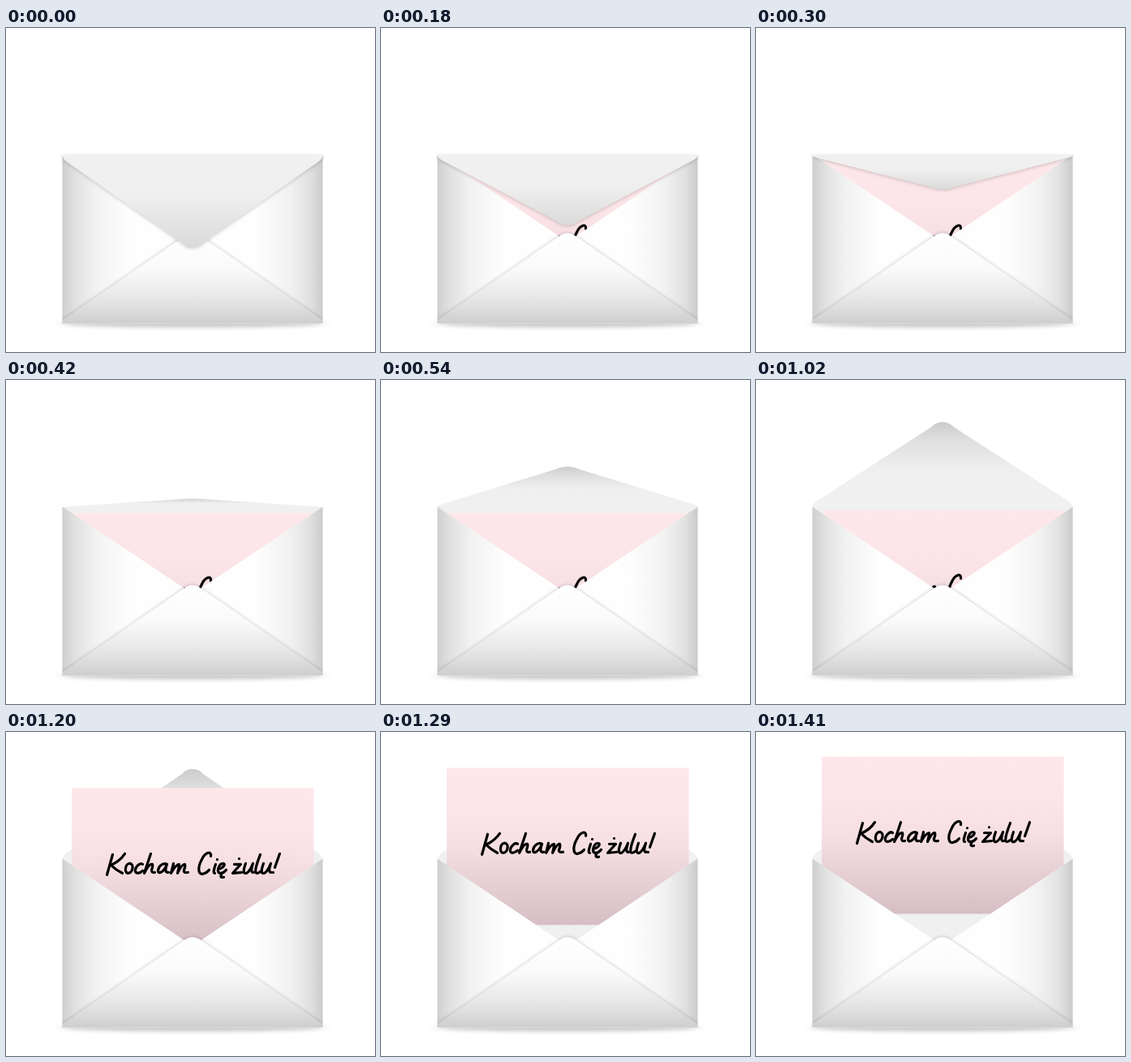
Write an HTML page that moves like this. It is 455 px wide and 400 px high and loops after 1530 ms.

```html
<!DOCTYPE html>
<html lang="pl">
<head>
<meta charset="utf-8">
<title>Koperta</title>
<style>
  html, body { margin: 0; width: 100%; height: 100%; overflow: hidden; background: #fff; }
  svg { display: block; width: 455px; height: 400px; }
  #front { filter: drop-shadow(0 1px 2px rgba(0, 0, 0, .2)); }
  #bottom { filter: drop-shadow(0 0 2px rgba(0, 0, 0, .24)); }
  #ink { fill: none; stroke: #000; stroke-width: 3.2; stroke-linecap: round; stroke-linejoin: round; }
</style>
</head>
<body>
<svg viewBox="0 0 455 400">
  <defs>
    <linearGradient id="outside" x2="0" y2="1">
      <stop stop-color="#f1f1f1"/><stop offset=".45" stop-color="#efefef"/>
      <stop offset="1" stop-color="#dadada"/>
    </linearGradient>
    <linearGradient id="inside" x2="0" y2="1">
      <stop stop-color="#f1f1f1"/><stop offset=".45" stop-color="#efefef"/>
      <stop offset=".8" stop-color="#dedede"/><stop offset="1" stop-color="#cbcbcb"/>
    </linearGradient>
    <linearGradient id="paperFill" x2="0" y2="1">
      <stop stop-color="#fee7ea"/><stop offset=".3" stop-color="#fce5e8"/>
      <stop offset=".5" stop-color="#f6dfe3"/><stop offset="1" stop-color="#d5bfc4"/>
    </linearGradient>
    <linearGradient id="sideFill">
      <stop stop-color="#cfcfcf"/><stop offset=".05" stop-color="#e1e1e1"/>
      <stop offset=".13" stop-color="#f2f2f2"/><stop offset=".26" stop-color="#fefefe"/>
      <stop offset=".74" stop-color="#fefefe"/><stop offset=".87" stop-color="#f2f2f2"/>
      <stop offset=".95" stop-color="#e1e1e1"/><stop offset="1" stop-color="#cbcbcb"/>
    </linearGradient>
    <linearGradient id="bottomFill" x2="0" y2="1">
      <stop stop-color="#fff"/><stop offset=".4" stop-color="#fafafa"/>
      <stop offset=".75" stop-color="#e5e5e5"/><stop offset="1" stop-color="#cecece"/>
    </linearGradient>
    <filter id="soft" x="-20%" y="-200%" width="140%" height="500%">
      <feGaussianBlur stdDeviation="8 2.5"/>
    </filter>
    <clipPath id="body"><path d="M69.500 150H390.500V364.500H69.500Z"/></clipPath>
    <path id="flap" d="M-.5 0Q0 5 6 9L147 108Q152 114 160 114Q168 114 173 108L314 9Q320 5 320.500 0Z"/>
  </defs>

  <ellipse cx="230" cy="365" rx="162" ry="5" fill="#000" opacity=".2" filter="url(#soft)"/>
  <use id="back" href="#flap" fill="url(#inside)"/>
  <path d="M69.500 157H390.500V364H69.500Z" fill="#f0f0f0"/>
  <g id="paper">
    <path d="M81 0H379.500V194H81Z" fill="url(#paperFill)"/>
    <g id="ink" role="img"></g>
  </g>
  <path d="M69.500 156.500L230 264L390.500 156.500V364.500H69.500Z" fill="url(#sideFill)"/>
  <g clip-path="url(#body)">
    <path id="bottom" d="M69 364.500V361L219 257.500Q230 249 241 257.500L391 361V364.500Z" fill="url(#bottomFill)"/>
  </g>
  <g id="front"><use id="cover" href="#flap" fill="url(#outside)"/></g>
</svg>
<script>
const $ = id => document.getElementById(id);
const LOOP = 1530, STEP = 30, HINGE = 157, DEPTH = 114;

// Pen strokes on a zero baseline: [advance, path]
const pen = {
  K: [23, 'M9-23L2 2M24-24Q18-15 7-10Q13-4 21 0'],
  o: [13, 'M8-12C1-13 0 0 5 0C11 0 13-12 7-12'],
  c: [11, 'M10-11C6-14 0-6 1-2C2 1 7 0 10-3'],
  h: [17, 'M9-24Q5-12 1 0Q7-12 11-11Q12-9 10-4Q10 0 14-1'],
  a: [16, 'M12-11C6-14 1-7 1-3C1 2 8-1 12-11Q8 0 14-1'],
  m: [24, 'M4-12L1 0Q7-11 11-11Q11-8 9 0Q15-12 18-11Q19-8 17-4Q16 0 22-1'],
  C: [19, 'M17-21C18-28 10-26 6-17C0-6 2 2 7 1Q12 0 15-4'],
  i: [5, 'M4-11Q0 0 3 0M6-17v.1'],
  ę: [10, 'M2-5C9-6 12-12 8-12C3-12-1 0 5 0Q9 0 12-4M7 0Q3 6 9 5'],
  ż: [13, 'M3-11H11L1 0L12-1M9-18v.1'],
  u: [14, 'M4-12C0-1 2 1 5 0Q9-2 13-12Q9 0 14-1'],
  l: [8, 'M8-23Q-1 0 4 0Q6 0 8-2'],
  '!': [10, 'M10-24L4-7M2-1v.1'],
  ' ': [9, '']
};

function write(text, x, y) {
  $('ink').setAttribute('aria-label', text);
  $('ink').innerHTML = [...text].map(ch => {
    const [advance, d] = pen[ch];
    const mark = d && `<path d="${d}" transform="translate(${x} ${y})"/>`;
    x += advance;
    return mark;
  }).join('');
}

// Flap tip: [time, y, speed]
const tipKeys = [
  [0, 271, 0], [300, 199, -.44], [540, 107, -.22],
  [780, 70, -.11], [1020, 52, -.05], [1290, 45, 0]
];

function hermite(keys, t) {
  const last = keys[keys.length - 1];
  if (t >= last[0]) return last[1];
  const i = keys.findIndex(k => k[0] > t);
  const [t0, a, va] = keys[i - 1], [t1, b, vb] = keys[i];
  const d = t1 - t0, u = (t - t0) / d, w = 1 - u;
  return w * w * (1 + 2 * u) * a + u * u * (3 - 2 * u) * b + u * w * d * (w * va - u * vb);
}

// cubic-bezier(.25, .1, .25, 1)
function ease(x) {
  if (x <= 0) return 0;
  if (x >= 1) return 1;
  let lo = 0, hi = 1;
  for (let i = 0; i < 24; i++) {
    const s = (lo + hi) / 2;
    if (.75 * s * (1 - s) + s ** 3 < x) lo = s; else hi = s;
  }
  return .3 * lo * (1 - lo) ** 2 + 3 * lo * lo * (1 - lo) + lo ** 3;
}

function draw(t) {
  const scale = (hermite(tipKeys, t) - HINGE) / DEPTH;
  const place = `translate(70 ${HINGE}) scale(1 ${scale})`;
  const closed = scale > 0;
  $('back').setAttribute('transform', place);
  $('cover').setAttribute('transform', place);
  $('front').style.display = closed ? '' : 'none';
  $('back').style.display = closed ? 'none' : '';
  $('paper').setAttribute('transform', `translate(0 ${164 - 135.3 * ease((t - 1002) / 480)})`);
}

function tick() {
  const t = Math.floor((performance.now() - start) % LOOP / STEP) * STEP;
  draw(t < 60 ? 0 : Math.min(t, 1410));
  requestAnimationFrame(tick);
}

write('Kocham Cię żulu!', 122.5, 105);
const start = performance.now();
tick();
</script>
</body>
</html>
```
